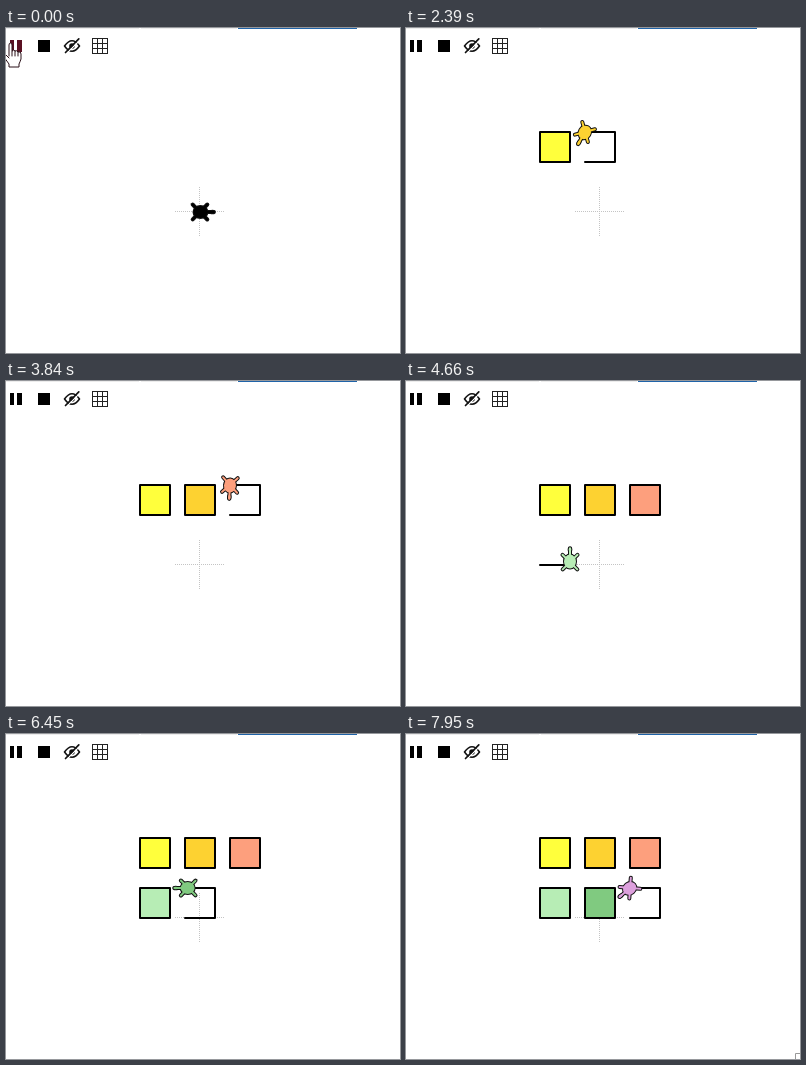
Recreate the animation shown at these times as an HTML page with a canvas. Size 394x325 px, loop 8 s.

```html
<!DOCTYPE html>
<html lang="en">
<head>
<meta charset="utf-8">
<title>Turtle squares</title>
<style>
  html, body { margin: 0; width: 100%; height: 100%; overflow: hidden; background: #fff; }
  canvas { display: block; }
</style>
</head>
<body>
<canvas id="stage" width="394" height="325"></canvas>
<script>
const ctx = document.getElementById('stage').getContext('2d');
const LOOP = 8000, SIDE = 30, FORWARD = 104, TURN = 218;
const LEG = FORWARD + TURN, DRAW = 4 * LEG;
const HOME = { x: 194, y: 184 };

// Lower left corner, start time and colour of each square
const squares = [
  { x: 134, y: 134, start: 110, color: '#ffff3c' },
  { x: 179, y: 134, start: 1497, color: '#fdd231' },
  { x: 224, y: 134, start: 2883, color: '#fd9f7d' },
  { x: 134, y: 184, start: 4329, color: '#b7edb5' },
  { x: 179, y: 184, start: 5714, color: '#80ca80' },
  { x: 224, y: 184, start: 7105, color: '#dda0dd' }
];

const clamp = v => Math.max(0, Math.min(1, v));
const mix = (a, b, p) => a + (b - a) * p;

function line(color, width, ...pts) {
  ctx.strokeStyle = color;
  ctx.lineWidth = width;
  ctx.beginPath();
  for (let i = 0; i < pts.length; i += 2) ctx.lineTo(pts[i], pts[i + 1]);
  ctx.stroke();
}

function rect(color, x, y, w, h) {
  ctx.fillStyle = color;
  ctx.fillRect(x, y, w, h);
}

function ellipse(color, x, y, rx, ry) {
  ctx.fillStyle = color;
  ctx.beginPath();
  ctx.ellipse(x, y, rx, ry, 0, 0, 7);
  ctx.fill();
}

function corners(sq) {
  const r = sq.x + SIDE, t = sq.y - SIDE;
  return [[sq.x, sq.y], [r, sq.y], [r, t], [sq.x, t], [sq.x, sq.y]];
}

// Position and heading while a square is being drawn
function poseIn(sq, time) {
  const leg = Math.min(3, Math.floor(time / LEG));
  const part = time - leg * LEG;
  const [a, b] = corners(sq).slice(leg, leg + 2);
  const p = clamp(part / FORWARD);
  const turned = clamp((part - FORWARD) / TURN);
  return {
    x: mix(a[0], b[0], p), y: mix(a[1], b[1], p),
    angle: -(leg + turned) * Math.PI / 2, leg, color: sq.color
  };
}

function poseAt(t) {
  let from = { ...HOME, start: 60 - DRAW, color: '#000' };
  for (const sq of squares) {
    if (t < sq.start) {
      const leave = from.start + DRAW;
      const p = clamp((t - leave) / (sq.start - leave));
      return { x: mix(from.x, sq.x, p), y: mix(from.y, sq.y, p), angle: 0, color: from.color };
    }
    if (t < sq.start + DRAW) return poseIn(sq, t - sq.start);
    from = sq;
  }
  return poseIn(from, DRAW);
}

function drawSquare(sq, t) {
  const time = t - sq.start;
  if (time < 0) return;
  const done = time >= DRAW;
  if (done) rect(sq.color, sq.x, sq.y - SIDE, SIDE, SIDE);
  const pose = poseIn(sq, Math.min(time, DRAW));
  const pts = corners(sq).slice(0, pose.leg + 1);
  pts.push([pose.x, pose.y]);
  line('#000', 2, ...pts.flat());
}

function turtleShape(color, grow) {
  const limb = 2 + 2 * grow;
  for (const s of [-1, 1]) {
    line(color, limb, 0, 0, -7.3, s * 7.3);
    line(color, limb, 0, 0, 7.3, s * 7.5);
  }
  line(color, limb, 0, 0, 13, 0);
  ellipse(color, 12.5, 0, 2.4 + grow, 1.3 + grow);
  ellipse(color, 0.5, 0, 7 + grow, 6 + grow);
}

function drawTurtle(pose) {
  ctx.save();
  ctx.translate(pose.x, pose.y);
  ctx.rotate(pose.angle);
  turtleShape('#111', 1);
  turtleShape(pose.color, 0);
  ctx.restore();
}

function drawCrosshair() {
  for (let i = -25; i < 25; i += 2) {
    rect('#c4c4c4', HOME.x + i, HOME.y - 1, 1, 1);
    rect('#c4c4c4', HOME.x - 1, HOME.y + i, 1, 1);
  }
}

function drawToolbar(hover) {
  rect('#ececec', 0, 0, 133, 1);
  rect('#ececec', 135, 0, 96, 1);
  rect('#1f63a8', 232, 0, 119, 1);

  const pause = hover ? '#5a1022' : '#000';
  rect(pause, 4, 12, 4, 12);
  rect(pause, 11, 12, 5, 12);
  rect('#000', 32, 12, 12, 12);

  // Crossed-out eye
  ctx.strokeStyle = '#111';
  ctx.lineWidth = 1.6;
  ctx.beginPath();
  ctx.moveTo(58.5, 18);
  ctx.quadraticCurveTo(66, 7.5, 73.5, 18);
  ctx.quadraticCurveTo(66, 28.5, 58.5, 18);
  ctx.stroke();
  ellipse('#111', 66, 18, 2.8, 2.8);
  line('#fff', 1.2, 60.5, 25.5, 74, 12);
  line('#111', 1.7, 59.5, 24.5, 72.8, 10.8);

  for (const d of [0, 5, 10, 15]) {
    rect('#222', 86 + d, 10, 1, 16);
    rect('#222', 86, 10 + d, 16, 1);
  }
}

function drawHand() {
  const hand = new Path2D('M3 28V17Q3 15 4.5 15T6 17V23Q8 21 9 23Q11 22 12 24' +
    'Q15 23 15 26V31Q14 34 13 36V39H3V36L-2 29Q-2 26 0 27L3 30');
  ctx.fillStyle = '#fff';
  ctx.fill(hand);
  ctx.strokeStyle = '#2a1018';
  ctx.lineWidth = 1;
  ctx.stroke(hand);
  for (const x of [6, 9, 12]) line('#2a1018', 1, x, 23, x, 28);
}

function draw(t) {
  const hover = t < 210;
  rect('#fff', 0, 0, 394, 325);
  ctx.lineCap = 'round';
  ctx.lineJoin = 'round';
  drawCrosshair();
  for (const sq of squares) drawSquare(sq, t);
  drawTurtle(poseAt(t));
  drawToolbar(hover);
  if (hover) drawHand();
  if (t >= 7945) line('#999', 1, 394, 319.5, 389.5, 319.5, 389.5, 325);
}

function tick() {
  draw(performance.now() % LOOP);
  requestAnimationFrame(tick);
}
tick();
</script>
</body>
</html>
```
